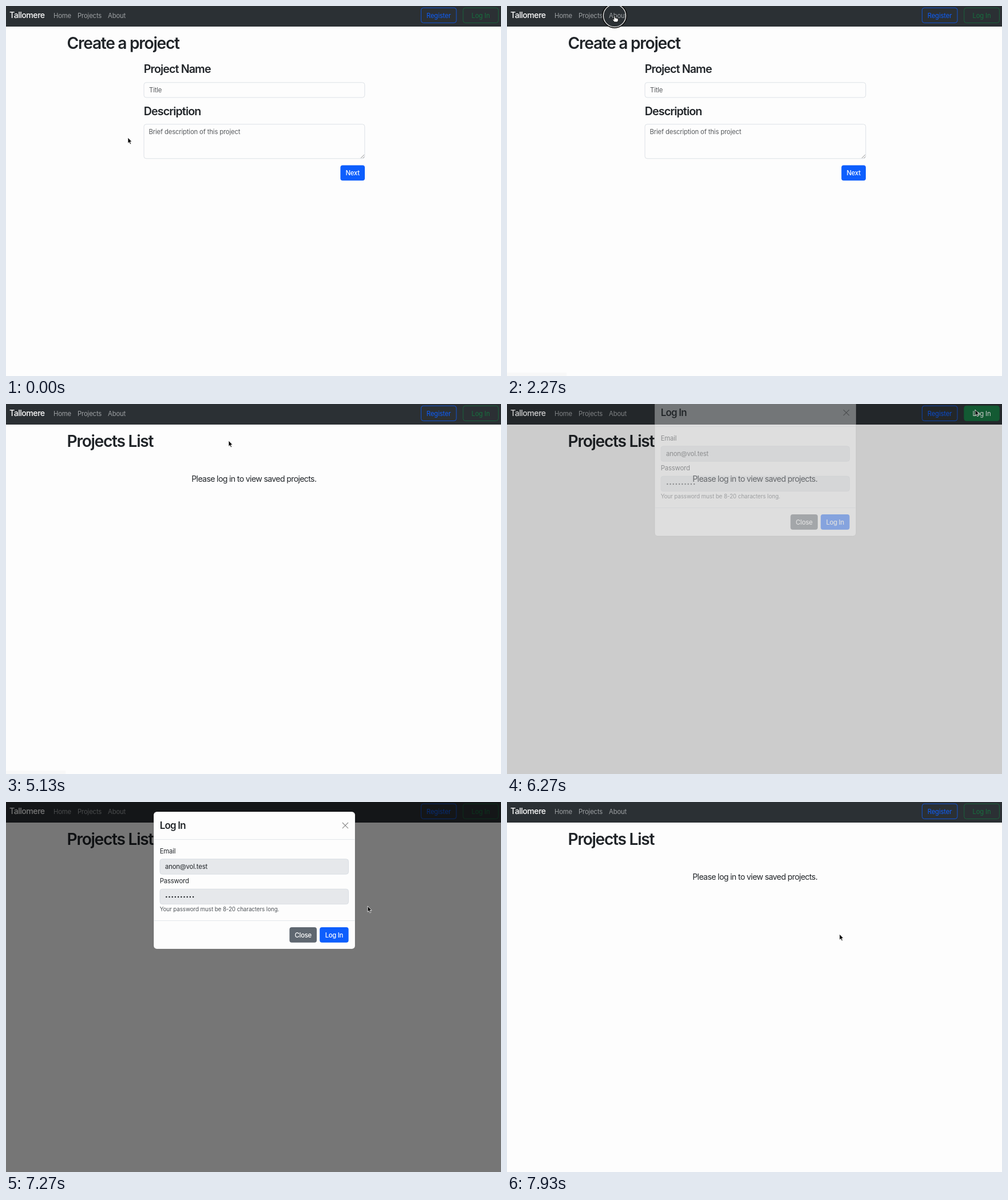
An HTML page that plays this animation: 865 px wide and 647 px high, repeating every 8 s.

```html
<!DOCTYPE html>
<html lang="en">
<head>
<meta charset="utf-8">
<title>Project planner demo</title>
<style>
html, body { margin: 0; width: 100%; height: 100%; overflow: hidden; background: #fdfdfd; }
svg { display: block; width: 100%; height: 100%; }
text { font: 400 11.3px Inter, "Open Sans", sans-serif; letter-spacing: -.014em; fill: #212529; }
.mid { text-anchor: middle; }
.brand { font-size: 14.1px; font-weight: 500; letter-spacing: -.035em; fill: #fff; }
.link { fill: #9da0a3; }
.white { fill: #fff; font-weight: 500; letter-spacing: -.025em; }
.h1 { font-size: 28.2px; font-weight: 600; letter-spacing: -.046em; }
.h3 { font-size: 19.7px; font-weight: 600; letter-spacing: -.046em; }
.h4 { font-size: 16.9px; font-weight: 600; letter-spacing: -.046em; }
.huge { font-size: 56.3px; font-weight: 700; letter-spacing: -.025em; }
.lead { font-size: 14.1px; letter-spacing: -.045em; }
.lead tspan { fill: #0d5efd; }
.hint { fill: #585b5e; }
.small { font-size: 9.9px; letter-spacing: -.012em; fill: #50555a; }
</style>
</head>
<body>
<svg id="stage" viewBox="0 0 865 647">
  <rect width="865" height="647" fill="#fdfdfd"/>
  <rect id="status" y="641" width="104" height="6" fill="#f8f8f8"/>
  <g id="nav"><rect width="865" height="36" fill="#2b3034"/></g>
  <g id="create"></g>
  <g id="about"></g>
  <g id="projects"></g>
  <rect id="shade" width="865" height="647"/>
  <g id="modal"></g>
  <g id="ring" fill="none">
    <circle r="20.5" stroke="#111" stroke-width="3"/>
    <circle r="19.6" stroke="#fff" stroke-width="1.2"/>
  </g>
  <g id="pointer" stroke-linejoin="round">
    <path id="arrow" d="M0 0V10.2L2.3 8.2L3.9 11.8L5.6 11L4 7.5H7Z" fill="#000" stroke="#fff" stroke-width=".8"/>
    <path id="hand" d="M-1.2 .8Q0 -.7 1 .8V4Q2.2 3.2 3 4.4Q4.2 3.7 4.8 4.9Q6.2 4.4 6.3 6V8.4L5.3 11H-.6L-3.6 7Q-3.8 5.4 -2.4 5.9L-1.2 7Z" fill="#fff" stroke="#000" stroke-width=".9"/>
  </g>
</svg>
<script>
const NS = 'http://www.w3.org/2000/svg';
const $ = id => document.getElementById(id);
const BLUE = '#0d5efd', GREEN = '#17703f';

function add(parent, tag, attrs, content) {
  const el = document.createElementNS(NS, tag);
  for (const k in attrs) el.setAttribute(k, attrs[k]);
  if (content) el.innerHTML = content;
  return $(parent).appendChild(el);
}
const text = (p, x, y, cls, s) => add(p, 'text', { x, y, class: cls }, s);
const box = (p, x, y, width, height, fill, stroke = 'none', rx = 4) =>
  add(p, 'rect', { x, y, width, height, fill, stroke, rx, 'stroke-width': .8 });
function button(p, x, y, w, label, fill) {
  box(p, x, y, w, 26.8, fill);
  text(p, x + w / 2, y + 17.5, 'mid white', label);
}

text('nav', 6, 21, 'brand', 'Tallomere');
text('nav', 83, 20.5, 'link', 'Home');
text('nav', 125, 20.5, 'link', 'Projects');
text('nav', 178, 20.5, 'link', 'About');
box('nav', 725.4, 3.2, 61.6, 26.2, 'none', BLUE);
text('nav', 756, 20.5, 'mid', 'Register').style.fill = BLUE;
const loginBox = box('nav', 798.8, 3.2, 61.6, 26.2, GREEN, GREEN);
const loginText = text('nav', 829.5, 20.5, 'mid', 'Log In');

text('create', 106.5, 75, 'h1', 'Create a project');
text('create', 240.7, 117, 'h3', 'Project Name');
box('create', 241, 133.8, 385.8, 26.2, 'none', '#d5dae0');
text('create', 250, 151, 'hint', 'Title');
text('create', 240.7, 190.5, 'h3', 'Description');
box('create', 241, 206.8, 385.8, 60, 'none', '#d5dae0');
text('create', 249.5, 224, 'hint', 'Brief description of this project');
add('create', 'path', { d: 'M620 266L626 260M623.5 266L626 263.5', stroke: '#777', 'stroke-width': .8 });
button('create', 584.4, 278.4, 42.6, 'Next', BLUE);

text('about', 433.5, 103, 'huge mid', 'About');
text('about', 433.3, 136, 'lead mid',
  'Tallomere is a full stack Vexil application created by <tspan>Dorian Vey</tspan>. Please view the source on <tspan>Codlum</tspan>.');
button('about', 400, 153.3, 67, 'Go Home', BLUE);

text('projects', 106.5, 75, 'h1', 'Projects List');
text('projects', 433.3, 136, 'lead mid', 'Please log in to view saved projects.');

box('modal', 258, 17, 352, 240, '#fdfdfd', 'rgba(0,0,0,.2)', 5.6);
text('modal', 268.7, 47, 'h4', 'Log In');
add('modal', 'path', { d: 'M587.8 36L598 46.2M598 36L587.8 46.2', stroke: '#8c8c8c', 'stroke-width': 1.1 });
add('modal', 'path', { d: 'M258 65.5H610M258 207.5H610', stroke: '#dee2e6', 'stroke-width': .8 });
text('modal', 268.7, 90, '', 'Email');
box('modal', 269, 99.8, 329.5, 26.4, '#e6e8eb', '#d5dae0');
text('modal', 278, 117.3, '', 'anon@vol.test');
text('modal', 268.7, 142, '', 'Password');
box('modal', 269, 152.2, 329.5, 26.4, '#e6e8eb', '#d5dae0');
for (let i = 0; i < 10; i++) add('modal', 'circle', { cx: 280.3 + i * 5.2, cy: 166, r: 1.25, fill: '#212529' });
text('modal', 268.7, 191.4, 'small', 'Your password must be 8-20 characters long.');
button('modal', 495.4, 219, 47.6, 'Close', '#5f6770');
button('modal', 548.2, 219, 50.4, 'Log In', BLUE);

// pointer stops: time, x, y
const PATH = [
  [0, 213, 230], [900, 213, 230], [1750, 188, 17], [2600, 188, 17], [3050, 200, 70],
  [3250, 200, 70], [3750, 157, 21], [4400, 157, 21], [5000, 389, 64], [5180, 389, 64],
  [5950, 818, 10], [6500, 818, 10], [7150, 632, 182], [7290, 632, 182], [7650, 581, 231], [8000, 581, 231]
];
const CLICKS = [[2200, 2335], [3950, 4080], [6080, 6205], [7690, 7810]];
const LOOP = 8000;

const clamp = v => Math.min(1, Math.max(0, v));
const ramp = (t, from, to) => clamp((t - from) / (to - from));
const inside = (t, [a, b]) => t >= a && t < b;
const show = (el, on) => el.setAttribute('visibility', on ? 'visible' : 'hidden');
const easeOut = u => 1 - Math.pow(1 - u, 1.5);

function pointerAt(t) {
  const i = Math.max(1, PATH.findIndex(p => p[0] > t));
  const [t0, x0, y0] = PATH[i - 1], [t1, x1, y1] = PATH[i];
  const u = ramp(t, t0, t1), e = u * u * (3 - 2 * u);
  return [x0 + (x1 - x0) * e, y0 + (y1 - y0) * e];
}

function draw(t) {
  show($('create'), t < 2335);
  show($('about'), inside(t, [2335, 4080]));
  show($('projects'), t >= 4080);
  show($('status'), inside(t, [1750, 2900]) || inside(t, [4080, 5200]));

  const [x, y] = pointerAt(t);
  const at = `translate(${x} ${y})`;
  const overLink = y < 28 && (x < 215 || x > 798) && t < 6210;
  $('pointer').setAttribute('transform', at);
  $('ring').setAttribute('transform', at);
  show($('hand'), overLink);
  show($('arrow'), !overLink);
  show($('ring'), CLICKS.some(c => inside(t, c)));

  const hover = ramp(t, 5850, 6000) - ramp(t, 6275, 6425);
  loginBox.setAttribute('fill-opacity', hover);
  loginText.style.fill = hover > .5 ? '#fff' : GREEN;

  const fade = ramp(t, 6216, 6366) - ramp(t, 7805, 7925);
  const slide = easeOut(ramp(t, 6216, 6516)) - easeOut(ramp(t, 7805, 8105));
  $('shade').setAttribute('opacity', fade * .535);
  $('modal').setAttribute('opacity', fade);
  $('modal').setAttribute('transform', `translate(0 ${-35.2 * (1 - slide)})`);
}

const start = performance.now();
function tick() {
  draw((performance.now() - start) % LOOP);
  requestAnimationFrame(tick);
}
tick();
</script>
</body>
</html>
```
